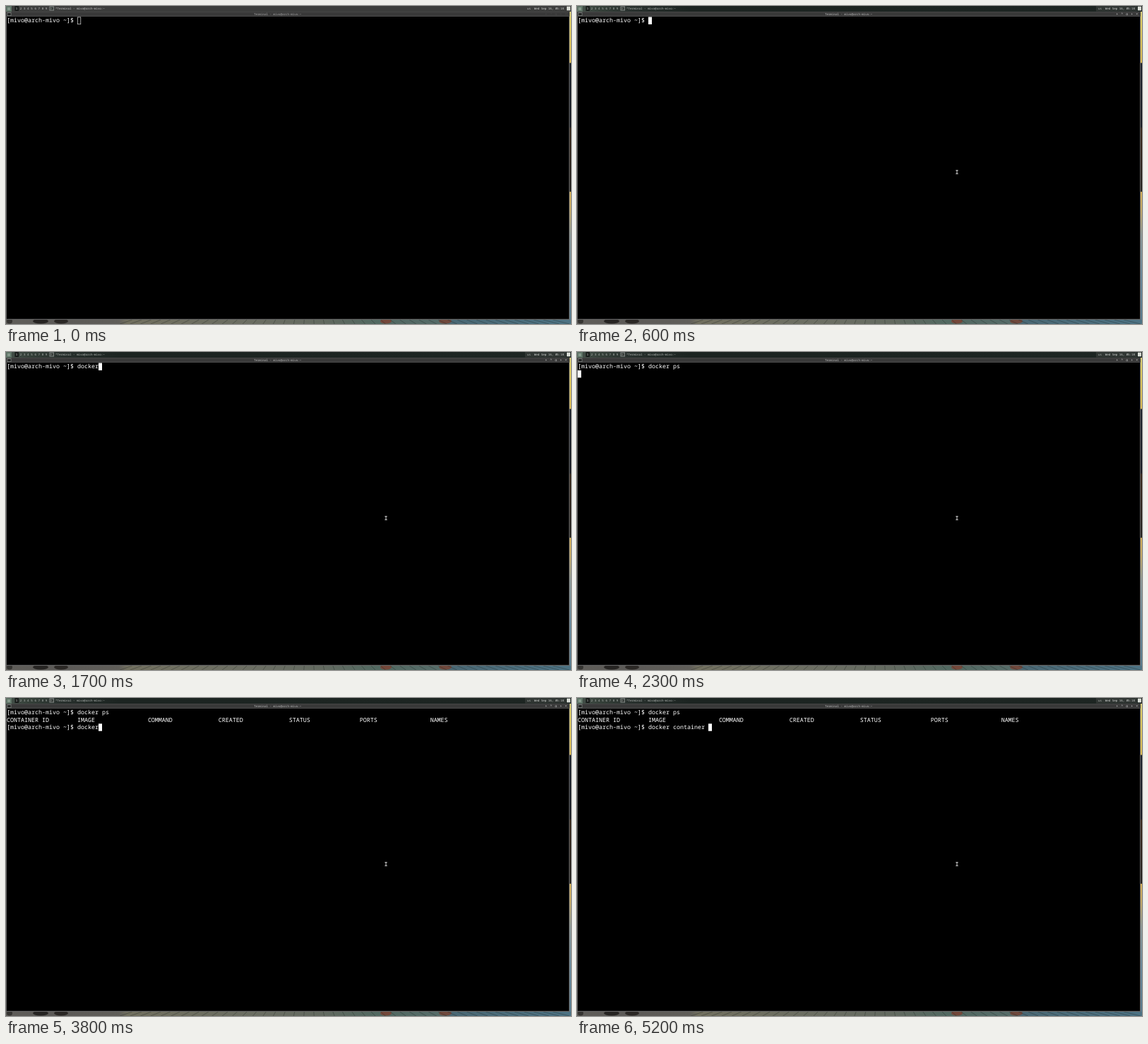
An HTML page with a canvas that plays this animation: 800 px wide and 450 px high, repeating every 8 s.

```html
<!DOCTYPE html>
<html lang="en">
<head>
<meta charset="utf-8">
<title>Terminal</title>
<style>
html, body { margin: 0; width: 100%; height: 100%; overflow: hidden; background: #000; }
canvas { display: block; }
</style>
</head>
<body>
<canvas id="stage" width="800" height="450"></canvas>
<script>
const ctx = document.getElementById('stage').getContext('2d');
const LOOP = 8000, CELL = 5, ROW = 10.417;
const PROMPT = '[mivo@arch-mivo ~]$ ';
const TITLE = 'Terminal - mivo@arch-mivo:~';
const HEADER = ['CONTAINER ID', 'IMAGE', 'COMMAND', 'CREATED', 'STATUS', 'PORTS', 'NAMES']
  .map(name => name.padEnd(20)).join('').trimEnd();

// Each entry: time in ms and the number of characters typed by then
const FIRST = { text: 'docker ps',
  keys: [[1000, 1], [1200, 2], [1300, 3], [1400, 4], [1500, 5], [1600, 6], [1800, 7], [2000, 9]] };
const SECOND = { text: 'docker container ',
  keys: [[3200, 1], [3400, 2], [3500, 3], [3600, 4], [3700, 5], [3800, 6], [4000, 7],
    [4400, 8], [4500, 9], [4700, 10], [4800, 11], [4900, 12], [5200, 17]] };
const ENTER = 2300, OUTPUT = 2600, FOCUS = 500, LEAVE_PANEL = 200;

function typed({ text, keys }, t) {
  let count = 0;
  for (const [time, n] of keys) if (t >= time) count = n;
  return PROMPT + text.slice(0, count);
}

function rect(x, y, w, h, color) {
  ctx.fillStyle = color;
  ctx.fillRect(x, y, w, h);
}

function text(str, x, y, size, color) {
  ctx.font = `${size}px "Noto Sans Mono", monospace`;
  ctx.fillStyle = color;
  ctx.fillText(str, x, y);
}

function gradient(x, y, w, h, stops) {
  const g = w > h ? ctx.createLinearGradient(x, 0, x + w, 0) : ctx.createLinearGradient(0, y, 0, y + h);
  for (const [at, color] of stops) g.addColorStop(at, color);
  rect(x, y, w, h, g);
}

function wallpaper() {
  gradient(797, 0, 3, 450, [[0, '#cfc98c'], [.05, '#dccb62'], [.178, '#d8b955'], [.18, '#1c222b'],
    [.38, '#171b22'], [.385, '#38291c'], [.46, '#30251c'], [.583, '#22211f'], [.585, '#d2ae58'],
    [.64, '#c3a866'], [.72, '#8c9897'], [.85, '#68889a'], [1, '#55788a']]);
  gradient(0, 444, 800, 6, [[0, '#5f5d59'], [.1, '#5c5a57'], [.2, '#605e59'], [.215, '#72705f'],
    [.45, '#6b6e63'], [.56, '#636a60'], [.655, '#526961'], [.77, '#566c69'], [.79, '#4a6874'], [1, '#4d7384']]);
  // Dark shapes and reddish posts
  for (const [x, rx, color] of [[5, 4, '#353431'], [49, 11, '#262422'], [78, 10, '#2b2825'],
    [538, 8, '#74483a'], [622, 9, '#70493d']]) {
    ctx.fillStyle = color;
    ctx.beginPath();
    ctx.ellipse(x, 446, rx, 3.5, 0, 0, 7);
    ctx.fill();
  }
  // Plank seams
  ctx.strokeStyle = 'rgba(30,36,32,.45)';
  ctx.lineWidth = .8;
  ctx.beginPath();
  for (let x = 170; x < 795; x += 14) {
    const lean = (430 - x) / 30;
    ctx.moveTo(x + lean, 444);
    ctx.lineTo(x - lean, 450);
  }
  ctx.stroke();
}

function panel(hovered) {
  if (hovered) rect(0, 0, 800, 8, '#3c3d3c');
  else gradient(0, 0, 800, 8, [[0, '#46524b'], [.04, '#354039'], [.09, '#29312e'], [.2, '#1c2421'], [1, '#1d2522']]);
  const ink = hovered ? '#c8c8c8' : '#b6bbb7';
  rect(0, 0, 8, 8, '#5d7265');
  rect(2, 2, 4, 4, '#84978a');
  rect(12.5, 0, 5.5, 7, '#171b19');
  text('1', 13.7, 4.6, 4.167, '#e8e8e8');
  for (let n = 2; n <= 9; n++) text(n, 19.8 + (n - 2) * 5.15, 4.6, 4.167, ink);
  rect(61.5, .5, 6.5, 6, '#8b908d');
  rect(62.3, 1.4, 4.9, 4.2, '#3a403d');
  text('>', 62.5, 4.8, 4, '#ccc');
  text('*' + TITLE, 70, 4.6, 4.167, ink);
  if (!hovered) rect(735, 0, 58, 7.5, '#303633');
  text('us', 738, 4.6, 4.167, ink);
  text('Wed Sep 16, 05:18', 747.7, 4.6, 4.167, '#d2d4d2');
  rect(794, .7, 5, 5.6, '#d9dcd5');
}

function titleBar(focused) {
  rect(0, 8, 798, 7, '#393939');
  rect(0, 8, 798, .6, '#4d4d4d');
  rect(1.5, 9, 6, 5, '#777c79');
  rect(2.3, 10, 4.4, 3.2, '#222');
  text(TITLE, 351, 13.3, 4.167, focused ? '#c4c4c4' : '#adadad');
  const ink = focused ? '#d8d8d8' : '#4b4b4b';
  ['+', '^', 'o', '+', '×'].forEach((sign, i) => text(sign, 763.2 + i * 7, 13.4, 5, ink));
}

function terminal(t, focused) {
  rect(0, 14.6, 798, 429.4, '#666');
  rect(1, 15, 796, 427.8, '#000');
  const lines = [typed(FIRST, t)];
  if (t >= OUTPUT) lines.push(HEADER, typed(SECOND, t));
  else if (t >= ENTER) lines.push('');
  lines.forEach((line, i) => text(line, 1, 23.2 + i * ROW, 8.333, '#fff'));

  const row = lines.length - 1;
  const x = 1 + lines[row].length * CELL, y = 15.5 + row * ROW;
  if (focused) rect(x, y, CELL, ROW, '#fff');
  else {
    ctx.strokeStyle = '#ddd';
    ctx.lineWidth = .7;
    ctx.strokeRect(x + .4, y + .4, CELL - .6, ROW - .6);
  }
}

function pointer(t) {
  if (t < 100) return;
  const p = Math.min(1, (t - 100) / 400), ease = 1 - (1 - p) ** 2;
  const x = 792 - 254 * ease, y = 5 + 230 * ease;
  rect(x - 1.7, y - 3, 3.4, .8, '#ddd');
  rect(x - .5, y - 3, 1, 6, '#ddd');
  rect(x - 1.7, y + 2.2, 3.4, .8, '#ddd');
}

function draw(now) {
  const t = Math.floor((now % LOOP) / 100) * 100;
  ctx.textRendering = 'geometricPrecision';
  rect(0, 0, 800, 450, '#000');
  wallpaper();
  titleBar(t >= FOCUS);
  panel(t < LEAVE_PANEL);
  terminal(t, t >= FOCUS);
  pointer(t);
  requestAnimationFrame(draw);
}
requestAnimationFrame(draw);
</script>
</body>
</html>
```
